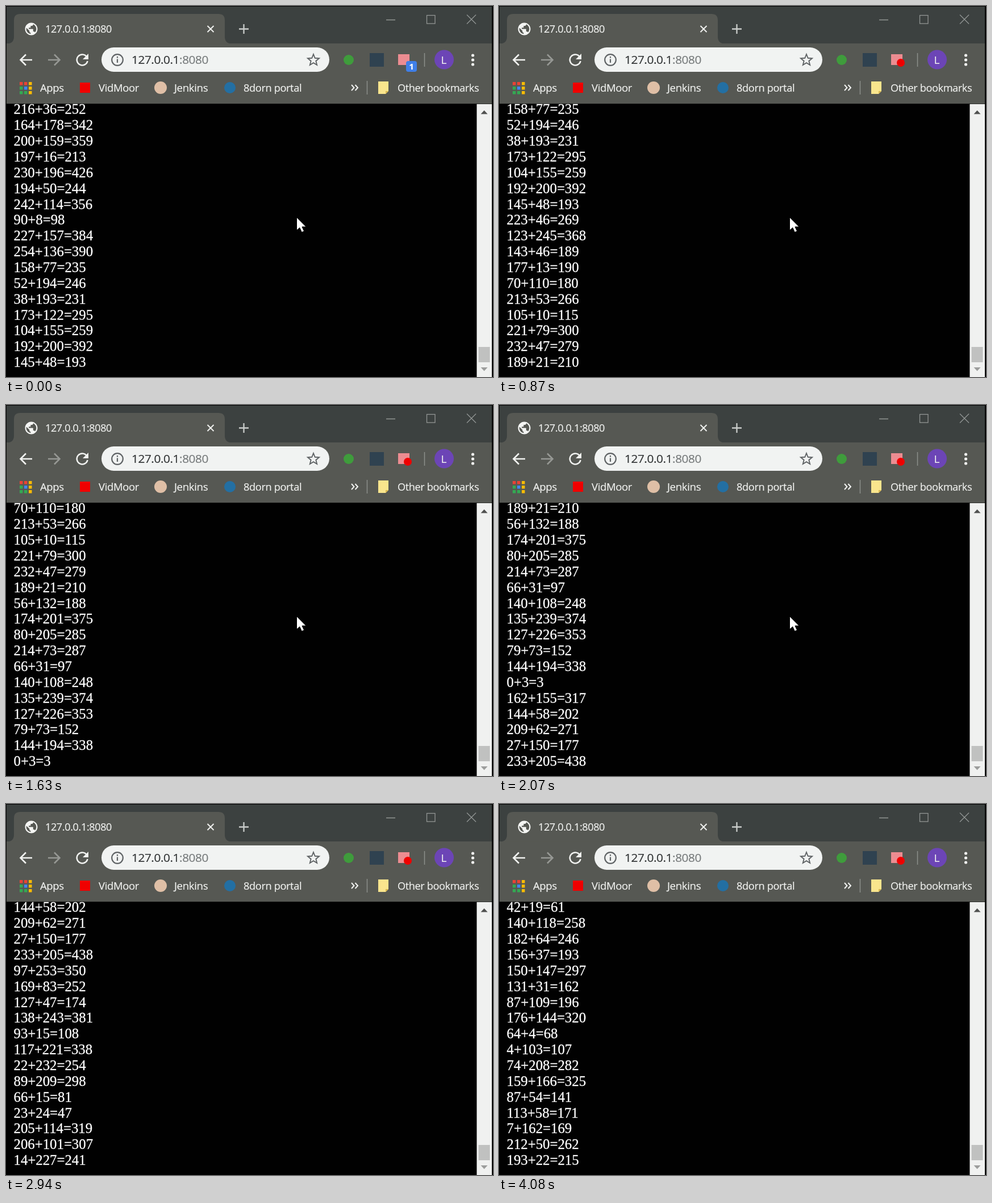
Write an HTML page that moves like this. It is 857 px wide and 654 px high and loops after 4150 ms.

```html
<!DOCTYPE html>
<html lang="en">
<head>
<meta charset="utf-8">
<title>Sums</title>
<style>
  html, body { margin: 0; width: 100%; height: 100%; overflow: hidden; background: #000; }
  svg { display: block; width: 857px; height: 654px; }
  .ui { font-family: "Open Sans", "Noto Sans", sans-serif; letter-spacing: -.02em; }
  .ui, .ui tspan { fill: currentColor; stroke: currentColor; stroke-width: .2; }
  .line { fill: none; stroke: #f1f2f0; stroke-width: 2.6; }
  #sums { font: 24.8px "Liberation Serif", "Times New Roman", serif; fill: #fff; stroke: #fff; stroke-width: .3; }
</style>
</head>
<body>
<svg viewBox="0 0 857 654">
  <!-- window and tab -->
  <rect x="1" y="1" width="854" height="66" fill="#3c4140"/>
  <rect x="1" y="66" width="854" height="106.5" fill="#565853"/>
  <path d="M2 66.5Q14 66 14 54V25Q14 14 25 14H374Q385 14 385 25V54Q385 66 397 66.5Z" fill="#565853"/>
  <path transform="translate(31.3 27.3) scale(1.1)" fill="#f4f5f3" d="M12 2C6.500 2 2 6.500 2 12s4.500 10 10 10 10-4.500 10-10S17.500 2 12 2zm-1 17.900c-3.900-.5-7-3.800-7-7.900 0-.6.1-1.200.2-1.800L9 15v1c0 1.100.9 2 2 2zm6.900-2.500c-.3-.8-1-1.400-1.900-1.400h-1v-3c0-.6-.4-1-1-1H8v-2h2c.6 0 1-.4 1-1V7h2c1.100 0 2-.9 2-2v-.4c2.900 1.200 5 4.100 5 7.400 0 2.100-.8 4-2.100 5.400z"/>
  <path class="line" d="M354.500 35l11 11m0-11l-11 11" style="stroke-width:2"/>
  <path class="line" d="M410 40.500h17M418.500 32v17" style="stroke:#c9ccca;stroke-width:2.300"/>
  <g fill="none" stroke="#929694" stroke-width="1.300">
    <path d="M669 24.500h16M811 15.500l16 16m0-16l-16 16"/>
    <rect x="740.500" y="16.500" width="14.500" height="14.500"/>
  </g>

  <!-- toolbar -->
  <path class="line" d="M46 95H26M35 85.500L25.500 95l9.500 9.500"/>
  <path class="line" d="M74 95h20M85 85.500l9.500 9.500-9.500 9.500" style="stroke:#969894"/>
  <path class="line" d="M142 89.500A9.500 9.500 0 1 0 143.500 97"/>
  <path d="M145 84v10h-10z" fill="#f1f2f0"/>
  <rect x="168" y="73" width="401" height="43" rx="21.500" fill="#f1f3f2"/>
  <g fill="none" stroke="#5f6365" stroke-width="2.200">
    <circle cx="196" cy="95" r="9.800"/>
    <path d="M196 93.500v6.500M196 89v2.500"/>
    <path id="star" stroke-width="1.900"/>
  </g>
  <circle cx="603" cy="95" r="9" fill="#3f9c3c"/>
  <rect x="640" y="83" width="25" height="24" fill="#2f4250"/>
  <rect x="690" y="85" width="20" height="19" fill="#ec8c91"/>
  <circle id="dot" cx="707" cy="100" r="7" fill="#ee0000"/>
  <g id="badge">
    <rect x="704" y="97" width="19" height="19" rx="4" fill="#3f7fe8"/>
    <text class="ui" x="713.500" y="112" font-size="14.500" font-weight="700" text-anchor="middle" color="#fff">1</text>
  </g>
  <path d="M736.500 83v24M635.500 132v24" stroke="#8d8f8b" stroke-width="1.500"/>
  <circle cx="771" cy="94.500" r="17" fill="#6c45b6"/>
  <g fill="#f1f2f0">
    <circle cx="821.500" cy="87" r="2.600"/>
    <circle cx="821.500" cy="95" r="2.600"/>
    <circle cx="821.500" cy="103" r="2.600"/>
  </g>

  <!-- bookmarks -->
  <g id="apps"></g>
  <rect x="130" y="135" width="18" height="18" fill="#f00000"/>
  <circle cx="272" cy="144" r="11" fill="#dfbfa6"/>
  <circle cx="394" cy="144" r="10" fill="#236fa3"/>
  <path class="line" d="M608 139l4.500 5-4.500 5M614.500 139l4.500 5-4.500 5" style="stroke-width:2"/>
  <path d="M655 133h18v17l-5 5h-13z" fill="#f9e58d"/>
  <path d="M673 150l-5 5v-5z" fill="#d9b84f"/>
  <g id="labels"></g>

  <!-- page -->
  <rect x="1" y="172.500" width="828" height="481.500" fill="#010101"/>
  <g id="sums"></g>
  <rect x="828.400" y="173" width="26.600" height="481" fill="#f0f1f0"/>
  <rect x="831.500" y="601" width="20" height="27" fill="#c0c1c0"/>
  <path d="M835.500 190.500l6-6.500 6 6.500z" fill="#4f504f"/>
  <path d="M835.500 637l6 6.500 6-6.500z" fill="#9c9d9c"/>
  <path id="cursor" d="M511.500 372.500v23l5.300-4.700 3.600 8 4.200-1.800-3.600-7.800h7z" fill="#fff" stroke="#000"/>
</svg>
<script>
const LOOP = 4150, ROWS = 17, BADGE_END = 80, CURSOR_END = 2430;
const $ = id => document.getElementById(id);

function add(parent, tag, attrs, text = "") {
  const el = document.createElementNS("http://www.w3.org/2000/svg", tag);
  for (const key in attrs) el.setAttribute(key, attrs[key]);
  el.textContent = text;
  return parent.appendChild(el);
}

const label = (x, y, size, text, color = "#f1f2f0") =>
  add($("labels"), "text", { class: "ui", x, y, "font-size": size, color }, text);

label(69, 46.5, 18, "127.0.0.1:8080");
const url = label(221, 102, 20.75, "127.0.0.1", "#303334");
add(url, "tspan", { color: "#777b7c" }, ":8080");
label(765.5, 101.5, 19, "L");
label(60, 150.5, 18.5, "Apps");
label(163, 150.5, 18.5, "VidMoor");
label(296, 150.5, 18.7, "Jenkins");
label(418, 150.5, 18.2, "8dorn portal");
label(689, 150.5, 18.1, "Other bookmarks");

const tint = { r: "#ea4335", y: "#fbbc05", g: "#34a853", b: "#4285f4" };
[..."rrygbyggy"].forEach((c, i) => add($("apps"), "rect",
  { x: 24 + i % 3 * 8, y: 134 + (i / 3 | 0) * 8, width: 5.5, height: 5.5, fill: tint[c] }));

const star = Array.from({ length: 10 }, (_, i) => {
  const r = i % 2 ? 4.6 : 10.5, a = i * Math.PI / 5;
  return `${541 + r * Math.sin(a)} ${95.5 - r * Math.cos(a)}`;
});
$("star").setAttribute("d", `M${star.join("L")}Z`);

const sums = `216+36 164+178 200+159 197+16 230+196 194+50 242+114 90+8 227+157 254+136
  158+77 52+194 38+193 173+122 104+155 192+200 145+48 223+46 123+245 143+46
  177+13 70+110 213+53 105+10 221+79 232+47 189+21 56+132 174+201 80+205
  214+73 66+31 140+108 135+239 127+226 79+73 144+194 0+3 162+155 144+58
  209+62 27+150 233+205 97+253 169+83 127+47 138+243 93+15 117+221 22+232
  89+209 66+15 23+24 205+114 206+101 14+227 238+60 42+19 140+118 182+64
  156+37 150+147 131+31 87+109 176+144 64+4 4+103 74+208 159+166 87+54
  113+58 7+162 212+50 193+22`.split(/\s+/).map(s => {
    const [a, b] = s.split("+");
    return `${s}=${+a + +b}`;
  });

// Runs of new lines: first time, last time, count
const runs = [[80, 230, 2], [230, 630, 6], [760, 1250, 8], [1330, 1700, 6],
  [1840, 2360, 8], [2430, 2940, 9], [3000, 3480, 9], [3540, 4080, 9]];
const ticks = runs.flatMap(([from, to, n]) => Array.from({ length: n },
  (_, i) => from + Math.ceil((to - from) * i / (n - 1) / 10) * 10));

const rows = Array.from({ length: ROWS }, (_, i) =>
  add($("sums"), "text", { x: 13.5, y: 190.4 + i * 27.86 }));

const show = (id, on) => $(id).style.display = on ? "" : "none";

let shown = -1;
function draw() {
  const t = performance.now() % LOOP;
  const first = ticks.filter(tick => tick <= t).length;
  if (first !== shown) {
    rows.forEach((row, i) => row.textContent = sums[first + i]);
    shown = first;
  }
  show("badge", t < BADGE_END);
  show("dot", t >= BADGE_END);
  show("cursor", t < CURSOR_END);
  requestAnimationFrame(draw);
}
draw();
</script>
</body>
</html>
```
